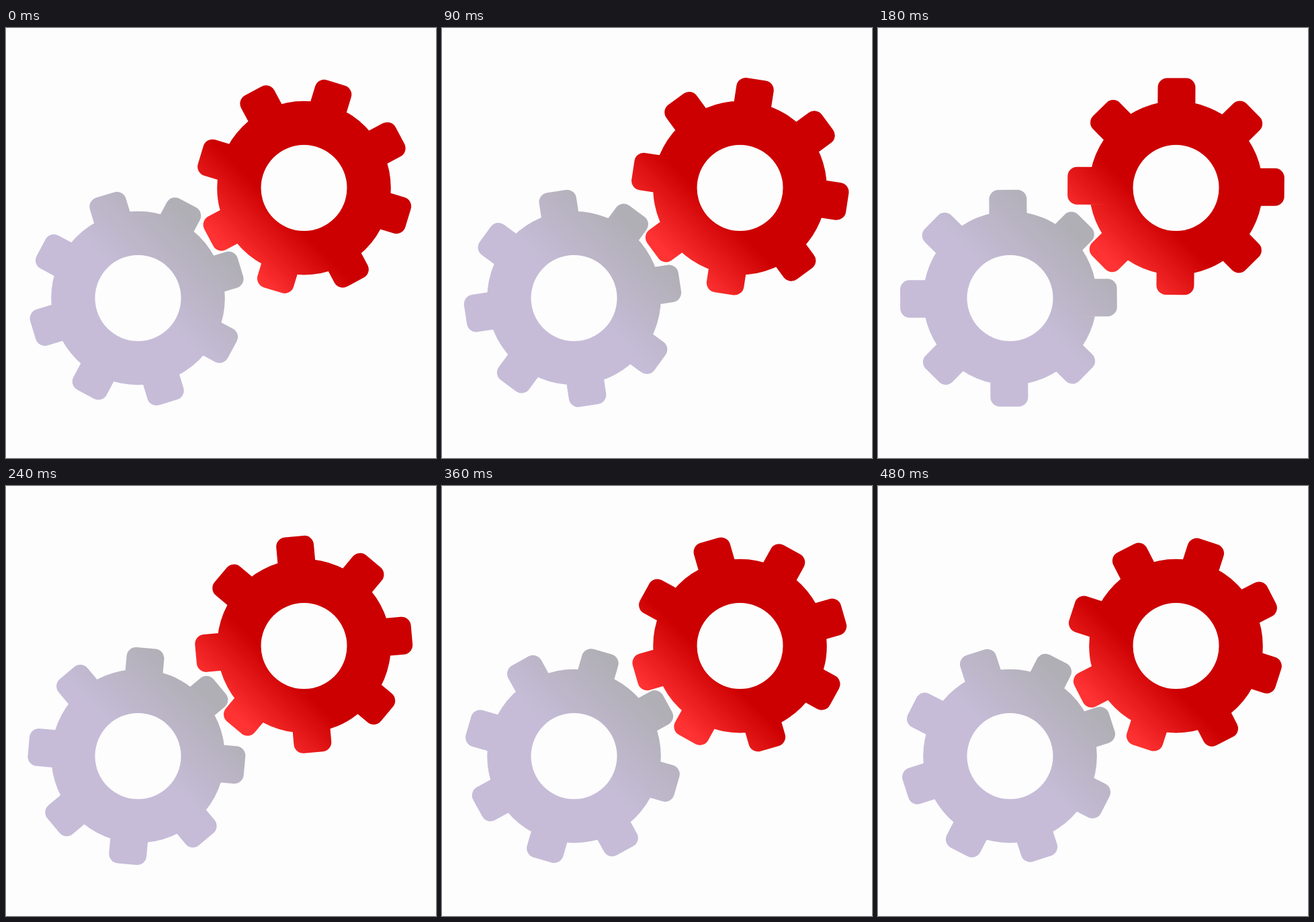
These frames come from a looping animation (640x640 px, 0.51 s). An HTML page:

```html
<!DOCTYPE html>
<html lang="en">
<head>
<meta charset="utf-8">
<title>Two gears</title>
<style>
  html, body { margin: 0; width: 100%; height: 100%; overflow: hidden; background: #fdfdfd; }
  svg { display: block; width: 100vw; height: 100vh; }
</style>
</head>
<body>
<svg viewBox="0 0 640 640">
  <defs>
    <linearGradient id="ash" gradientUnits="userSpaceOnUse" x1="105" y1="310" x2="200" y2="215">
      <stop offset="0" stop-color="#c6bcd8"/>
      <stop offset="1" stop-color="#b1afb6"/>
    </linearGradient>
    <linearGradient id="fire" gradientUnits="userSpaceOnUse" x1="300" y1="300" x2="370" y2="230">
      <stop offset="0" stop-color="#ff3333"/>
      <stop offset="1" stop-color="#cc0000"/>
    </linearGradient>
  </defs>
  <path id="grey" fill="url(#ash)"/>
  <path id="red" fill="url(#fire)"/>
</svg>
<script>
const STEP = 30, STEPS = 17, TURN = 2.75, START = 16.9;
const HOLE = 64, BODY = 129.3, TIP = 161.3, HALF = 28, ROUND = 14, TEETH = 8;

// dx, dy: how far the crown of teeth sits off the axle before turning
const gears = [
  { el: document.getElementById('grey'), x: 196.5, y: 402, dx: -2, dy: 0.8, dir: 1 },
  { el: document.getElementById('red'), x: 443.5, y: 238.1, dx: 0.6, dy: -2.2, dir: -1 }
];

function rotate(u, v, deg) {
  const a = deg * Math.PI / 180, c = Math.cos(a), s = Math.sin(a);
  return [u * c - v * s, u * s + v * c];
}

function ring(x, y, r, sweep) {
  const arc = `a${r} ${r} 0 1 ${sweep} `;
  return `M${x - r} ${y}${arc}${2 * r} 0${arc}${-2 * r} 0z`;
}

function tooth(x, y, deg) {
  const at = (u, v) => {
    const [px, py] = rotate(u, v, deg);
    return `${(x + px).toFixed(2)} ${(y + py).toFixed(2)}`;
  };
  const arc = `A${ROUND} ${ROUND} 0 0 1 `;
  const neck = TIP - ROUND, flat = HALF - ROUND;
  return `M${at(100, -HALF)}L${at(neck, -HALF)}${arc}${at(TIP, -flat)}` +
    `L${at(TIP, flat)}${arc}${at(neck, HALF)}L${at(100, HALF)}z`;
}

function drawGear(g, turned) {
  const [ox, oy] = rotate(g.dx, g.dy, g.dir * turned);
  const angle = g.dir * (turned - START);
  let d = ring(g.x, g.y, BODY, 1) + ring(g.x, g.y, HOLE, 0);
  for (let i = 0; i < TEETH; i++) {
    d += tooth(g.x + ox, g.y + oy, angle + i * 360 / TEETH);
  }
  g.el.setAttribute('d', d);
}

function render(ms) {
  const turned = Math.floor(ms / STEP) % STEPS * TURN;
  gears.forEach(g => drawGear(g, turned));
}

function tick() {
  render(performance.now());
  requestAnimationFrame(tick);
}
tick();
</script>
</body>
</html>
```
